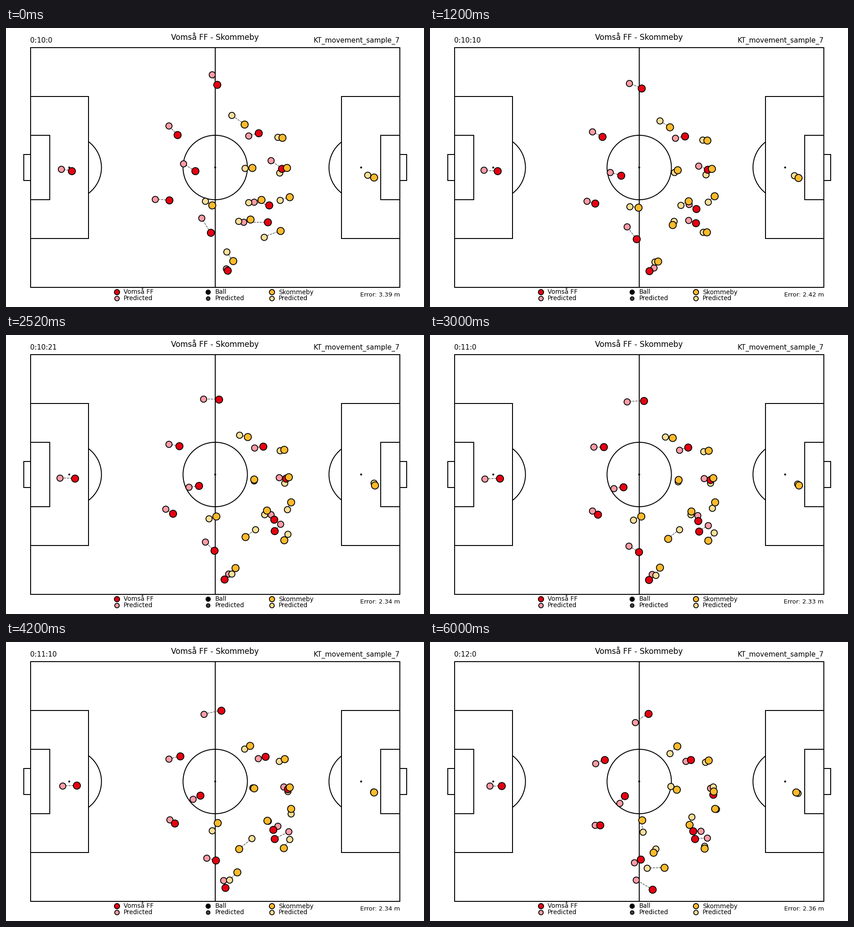
Write a matplotlib script that moves like this. It is 917x611 px and loops after 6.12 s.

```python
import matplotlib.pyplot as plt
import numpy as np
from matplotlib.animation import FuncAnimation
from matplotlib.patches import Arc, Circle, Rectangle

W, H, DPI = 917, 611, 128
PT = 72 / DPI  # points per pixel
FRAMES, STEP = 51, 120
FPS = 25

HOME, AWAY = "Vomså FF", "Skommeby"
RED, PINK = "#e60012", "#ff9ca6"
GOLD, CREAM = "#fcba2c", "#fbdf98"
DARK = "#444444"
LINE, EDGE = 2.0, 1.8

# Pitch, in pixels
LEFT, RIGHT, TOP, BOTTOM = 53.95, 864, 43.1, 567.9
CX, CY = (LEFT + RIGHT) / 2, (TOP + BOTTOM) / 2
METRE = (RIGHT - LEFT) / 105
RADIUS = 9.15 * METRE

plt.rcParams["font.family"] = "DejaVu Sans"
fig = plt.figure(figsize=(W / DPI, H / DPI), dpi=DPI, facecolor="white")
ax = fig.add_axes([0, 0, 1, 1])
ax.set(xlim=(0, W), ylim=(H, 0))
ax.axis("off")


def box(x, y, w, h):
    ax.add_patch(Rectangle((x, y), w, h, fill=False, lw=LINE * PT, zorder=1))


def arc(x, start, end):
    ax.add_patch(Arc((x, CY), 2 * RADIUS, 2 * RADIUS, theta1=start, theta2=end,
                     lw=LINE * PT, zorder=1))


def text(x, y, label, size, ha="left"):
    return ax.text(x, y, label, fontsize=size * PT, ha=ha, va="baseline")


def dots(x, y, color, size, z):
    return ax.plot(x, y, "o", ms=size * PT, mfc=color, mec="black",
                   mew=EDGE * PT, zorder=z)[0]


def draw_pitch():
    box(LEFT, TOP, RIGHT - LEFT, BOTTOM - TOP)
    ax.plot([CX, CX], [TOP, BOTTOM], color="black", lw=LINE * PT, zorder=1)
    for depth, width in ((16.53, 40.32), (5.5, 18.32), (-2, 7.32)):
        d, w = depth * METRE, width * METRE
        box(LEFT, CY - w / 2, d, w)
        box(RIGHT, CY - w / 2, -d, w)
    spot = 11 * METRE
    edge = np.degrees(np.arccos(5.5 / 9.15))
    arc(CX, 0, 360)
    arc(LEFT + spot, -edge, edge)
    arc(RIGHT - spot, 180 - edge, 180 + edge)
    for x in (LEFT + spot, CX, RIGHT - spot):
        ax.add_patch(Circle((x, CY), 2.1, color="black", lw=0, zorder=1))


def draw_legend():
    entries = ((243, 258, HOME, RED, PINK, 11.5),
               (443, 459, "Ball", "black", DARK, 9.5),
               (582.5, 598, AWAY, GOLD, CREAM, 11.5))
    for x, tx, name, color, pale, size in entries:
        dots([x], [578], color, size, 3)
        dots([x], [592], pale, size - 1.5, 3)
        text(tx, 582.5, name, 13.6)
        text(tx, 596.5, "Predicted", 13.6)


s = np.linspace(0, 1, FRAMES)
rng = np.random.default_rng(5)


def curve(start, middle, end):
    """Parabola through three points x + yj."""
    path = (start * (1 - s) * (1 - 2 * s) + middle * 4 * s * (1 - s)
            + end * s * (2 * s - 1))
    return path - (0.5 + 0.5j)


def wobble():
    """Random drift that vanishes at the start, middle and end."""
    waves = [np.sin(2 * np.pi * k * s) for k in range(1, 6)]
    return (rng.normal(0, 1, 5) + 1j * rng.normal(0, 1, 5)) @ waves


def run(real, guess):
    return curve(*real), curve(*guess) + wobble()


# Start, middle and end of each player's run, then of its prediction
home = [
    run((463+124j, 469+144j, 479+157j), (452+102j, 432+146.5j, 450+176j)),
    run((376.5+234j, 381+245.5j, 383+258j), (357+214.5j, 359.5+245.5j, 363+266.5j)),
    run((415+313.5j, 424.5+333j, 427.5+337j), (389.5+297.5j, 403.5+336j, 416+353j)),
    run((144.5+313.5j, 153+314.5j, 157.5+315.5j), (121+309j, 120+315.5j, 131.5+315.5j)),
    run((358.5+377.5j, 368+393.5j, 373.5+401j), (327.5+375j, 356.5+385j, 362.5+401j)),
    run((449+448.5j, 458.5+475.5j, 462+476j), (429.5+416.5j, 436+462.5j, 448+483j)),
    run((486+531j, 480+536j, 488.5+542.5j), (483+527.5j, 487+524j, 452+521j)),
    run((554.5+230.5j, 566+246.5j, 572.5+258j), (532+236.5j, 547+252j, 561+261.5j)),
    run((605.5+308j, 615.5+317j, 621.5+334.5j), (581+290j, 601.5+314.5j, 615+320.5j)),
    run((577+388j, 588.5+407j, 577+414.5j), (544+381.5j, 587.5+395.5j, 594+414.5j)),
    run((574.5+425j, 590.5+430.5j, 581+431.5j), (521.5+425j, 610+417.5j, 608+429.5j)),
]
away = [
    run((523.5+211j, 532+225j, 542.5+228j), (495+191j, 516+223j, 526.5+244j)),
    run((606.5+240j, 611+253j, 611+259j), (596+239j, 600+255j, 604.5+263.5j)),
    run((540.5+306j, 545+317.5j, 541.5+323j), (524.5+307j, 544+321j, 528.5+316.5j)),
    run((616+306j, 621.5+313.5j, 622.5+327.5j), (600+317.5j, 615+324j, 621.5+317.5j)),
    run((807.5+327.5j, 809+329.5j, 803.5+329.5j), (793+322j, 806+326j, 807+331j)),
    run((622.5+370j, 625.5+366.5j, 625.5+365.5j), (601+377.5j, 619.5+379j, 628.5+366.5j)),
    run((560.5+376j, 573.5+386j, 569.5+400.5j), (532+382.5j, 572+393j, 574.5+383.5j)),
    run((536+419j, 522.5+446.5j, 490.5+461j), (510.5+423j, 547+426.5j, 495+453j)),
    run((602.5+444.5j, 610.5+450.5j, 602+452.5j), (566+458j, 623.5+433.5j, 602.5+447j)),
    run((452+388j, 463+397.5j, 465+390j), (437+379.5j, 446.5+405j, 467+416.5j)),
    run((498+510.5j, 504.5+509j, 514+494.5j), (484+490j, 495+526j, 476.5+495.5j)),
]
teams = [np.array(home), np.array(away)]  # player, real or guess, frame
everyone = np.vstack(teams)
error = np.abs(everyone[:, 0] - everyone[:, 1]).mean(axis=0) / METRE

draw_pitch()
draw_legend()
text(458.5, 26, f"{HOME} - {AWAY}", 17, "center")
text(864, 31.3, "KT_movement_sample_7", 15.3, "right")
clock = text(53.5, 32, "", 15.3)
score = text(864, 588, "", 13.2, "right")

links = [ax.plot([], [], "--", color=DARK, lw=1.25 * PT, zorder=2)[0]
         for _ in everyone]
guesses = [dots([], [], c, 13.7, 3) for c in (PINK, CREAM)]
players = [dots([], [], c, 15.7, 4) for c in (RED, GOLD)]


def update(i):
    clock.set_text(f"0:{10 + i // FPS}:{i % FPS}")
    score.set_text(f"Error: {error[i]:.2f} m")
    for team, real, guess in zip(teams, players, guesses):
        for dot, spots in zip((real, guess), team[:, :, i].T):
            dot.set_data(spots.real, spots.imag)
    for link, ends in zip(links, everyone[:, :, i]):
        link.set_data(ends.real, ends.imag)
    return [clock, score, *links, *guesses, *players]


anim = FuncAnimation(fig, update, frames=FRAMES, interval=STEP,
                     repeat=True, repeat_delay=0)
plt.show()
```
